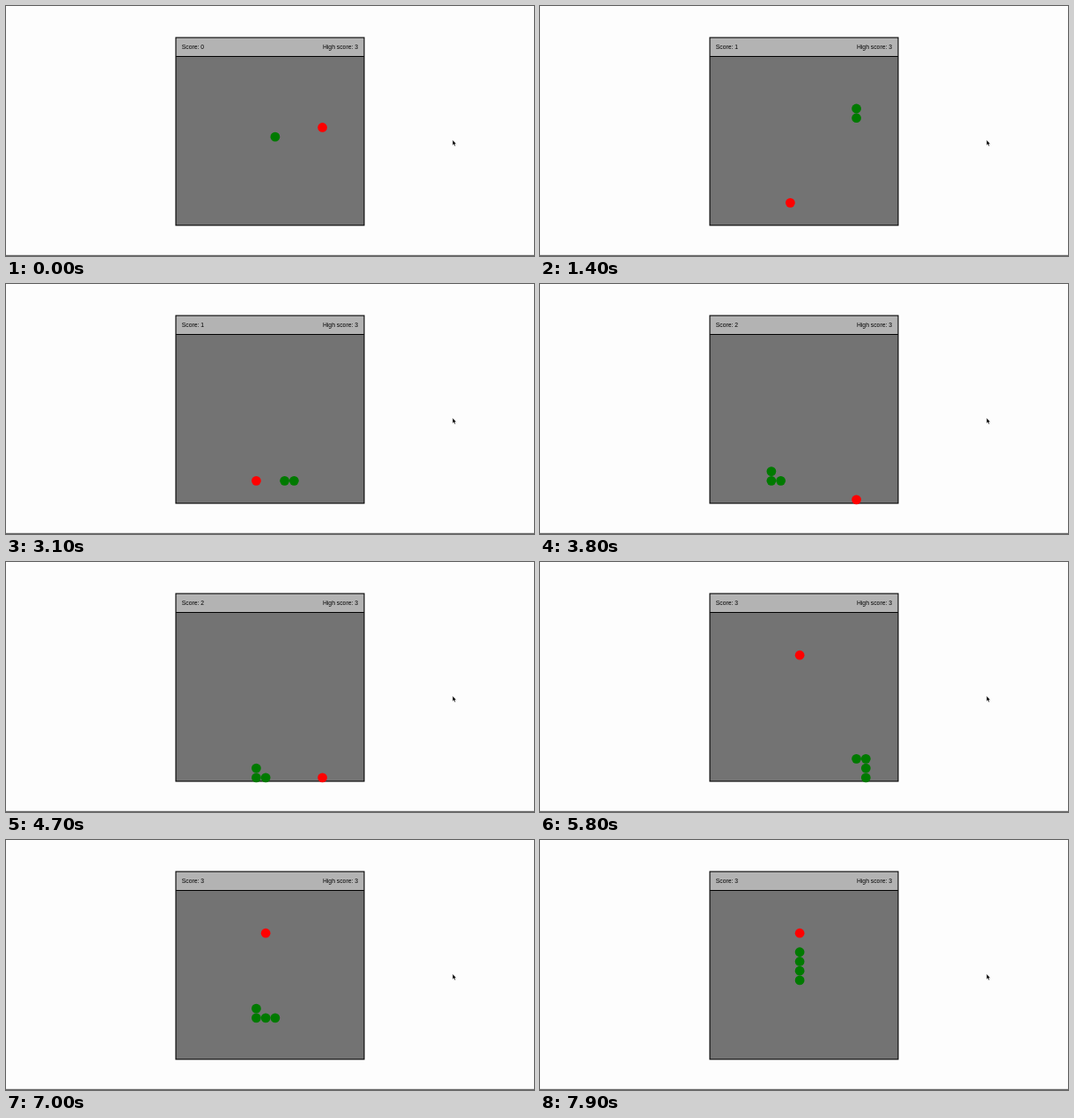
An HTML page that plays this animation: 600 px wide and 285 px high, repeating every 8000 ms.

```html
<!DOCTYPE html>
<html lang="en">
<head>
<meta charset="utf-8">
<title>Snake</title>
<style>
  html, body { margin: 0; width: 100%; height: 100%; overflow: hidden; background: #fdfdfd; }
  svg { display: block; width: 600px; height: 285px; }
  text { font: 6.8px "Liberation Sans", Arial, sans-serif; fill: #000; }
  .frame { fill: none; stroke: #000; }
</style>
</head>
<body>
<svg viewBox="0 0 600 285">
  <rect width="600" height="285" fill="#fdfdfd"/>
  <rect y="283" width="600" height="1" fill="#e6e6e6"/>
  <rect y="284" width="600" height="1" fill="#6a6a6a"/>
  <rect x="193" y="36" width="214" height="214" fill="#737373"/>
  <rect x="193" y="36" width="214" height="21.5" fill="#b3b3b3"/>
  <path class="frame" d="M193 57.5H407"/>
  <rect class="frame" x="193" y="36" width="214" height="214" stroke-width="1.1"/>
  <text id="score" x="199.8" y="49.4">Score: 0</text>
  <text x="400" y="49.4" text-anchor="end">High score: 3</text>
  <g id="pieces"></g>
  <path d="M507.5 152.8v6l1.3-1.2 1 2.2 1-.5-1-2h1.8z" fill="#000" stroke="#fff" stroke-width=".3"/>
</svg>
<script>
const LOOP = 8000, TICK = 100, CELL = 10.74, LEFT = 193.1, TOP = 36.4;
const RUNS = "R5 U3 L1 D10 L8 U1 R2 D3 R8 U2 L6 U2 L2 U4 R1 U3";
const DIRS = { R: [1, 0], L: [-1, 0], U: [0, -1], D: [0, 1] };
const FOODS = [[15, 9], [8, 17], [15, 19], [9, 6]];
// Ticks on which the snake does not advance
const PAUSES = new Set([8, 15, 17, 26, 32, 39, 42, 46, 55, 62, 67, 75]);
const FIRST_TICK = 6;

function buildPath() {
  const path = [[10, 10]];
  for (const run of RUNS.split(" ")) {
    const [dx, dy] = DIRS[run[0]];
    for (let n = +run.slice(1); n > 0; n--) {
      const [x, y] = path[path.length - 1];
      path.push([x + dx, y + dy]);
    }
  }
  return path;
}

// One state per move: the body, the number eaten and the current food
function buildStates(path) {
  let eaten = 0;
  return path.map(([x, y], i) => {
    const [fx, fy] = FOODS[eaten];
    if (x === fx && y === fy) eaten++;
    return { body: path.slice(Math.max(0, i - eaten), i + 1), eaten, food: FOODS[eaten] };
  });
}

const states = buildStates(buildPath());
const pieces = document.getElementById("pieces");
const score = document.getElementById("score");

function movesAt(time) {
  let moves = 0;
  for (let t = FIRST_TICK; t * TICK <= time; t++) if (!PAUSES.has(t)) moves++;
  return Math.min(moves, states.length - 1);
}

const dot = ([col, row], fill) =>
  `<circle cx="${LEFT + (col + 0.5) * CELL}" cy="${TOP + (row + 0.5) * CELL}" r="${CELL / 2}" fill="${fill}"/>`;

let shown = -1;
function draw() {
  const move = movesAt(performance.now() % LOOP);
  if (move !== shown) {
    const { body, eaten, food } = states[move];
    pieces.innerHTML = dot(food, "#f00") + body.map(cell => dot(cell, "#007a00")).join("");
    score.textContent = "Score: " + eaten;
    shown = move;
  }
  requestAnimationFrame(draw);
}
draw();
</script>
</body>
</html>
```
